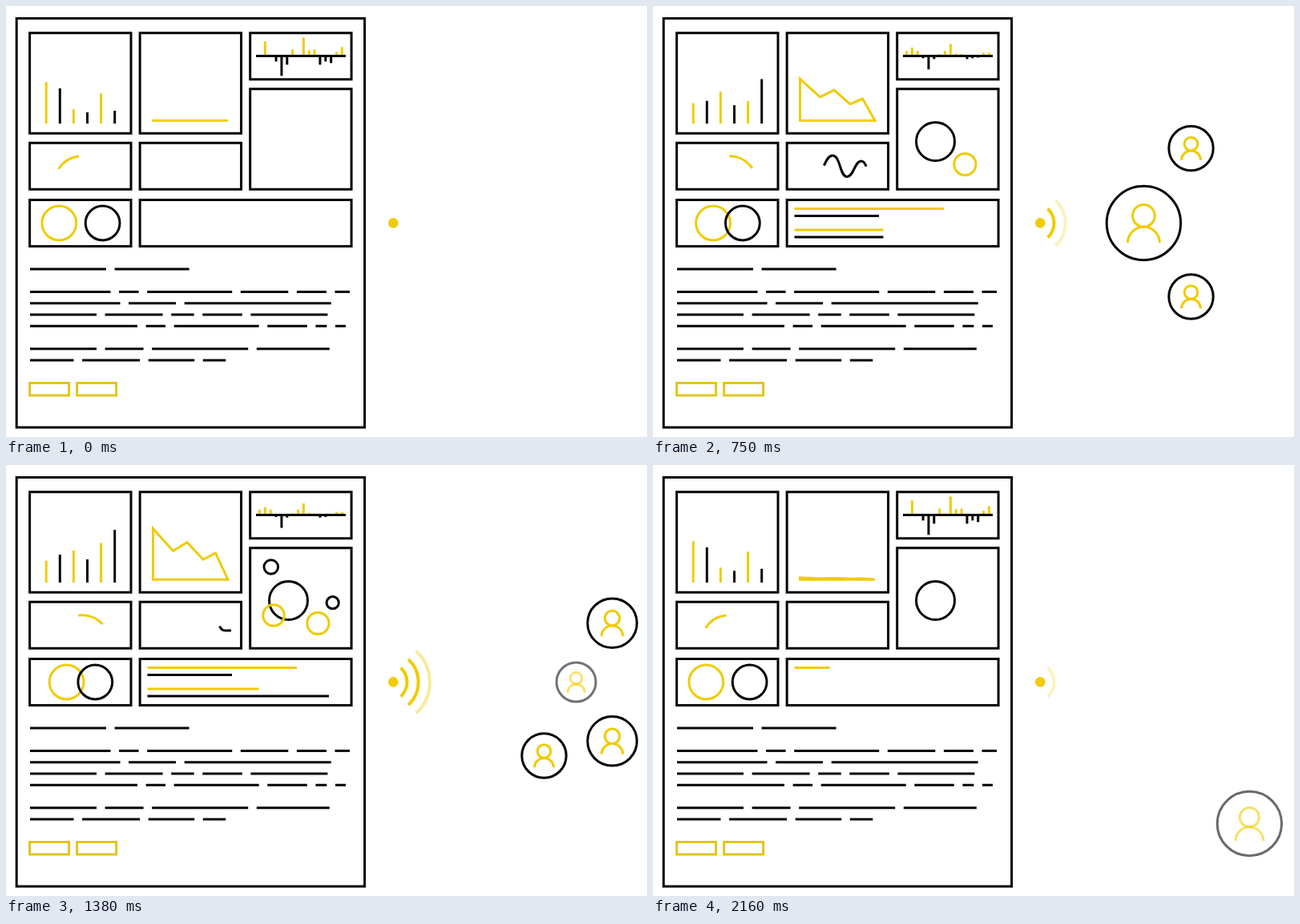
Animation of 800x539 px, one loop 2.19 s. Source, as an HTML page with a canvas:

```html
<!DOCTYPE html>
<html lang="en">
<head>
<meta charset="utf-8">
<title>Report broadcast</title>
<style>
  html, body { margin: 0; width: 100%; height: 100%; overflow: hidden; background: #fff; }
  canvas { display: block; }
</style>
</head>
<body>
<canvas id="stage" width="800" height="539"></canvas>
<script>
const ctx = document.getElementById('stage').getContext('2d');
const LOOP = 2190, STEP = 30;
const INK = '#050505', GOLD = '#f0cb05', BUTTON = '#e2c51c';
const { PI, cos, sin, min, max, abs } = Math;

const clamp = (v, lo = 0, hi = 1) => max(lo, min(hi, v));
const ramp = (t, start, span) => clamp((t - start) / span);
const ease = (p, n) => p < .5 ? (2 * p) ** n / 2 : 1 - (2 - 2 * p) ** n / 2;
const angle = t => 2 * PI * t / LOOP;

function stroke(color, path, width = 3) {
  ctx.strokeStyle = color;
  ctx.lineWidth = width;
  path ? ctx.stroke(path) : ctx.stroke();
}

function line(color, x1, y1, x2, y2) {
  ctx.beginPath();
  ctx.moveTo(x1, y1);
  ctx.lineTo(x2, y2);
  stroke(color);
}

function arc(color, x, y, r, from = 0, to = 2 * PI, width = 3) {
  ctx.beginPath();
  ctx.arc(x, y, r, from, to);
  stroke(color, null, width);
}

function box(x, y, w, h, color = INK) {
  ctx.beginPath();
  ctx.rect(x, y, w, h);
  stroke(color);
}

function panels() {
  const left = 29.6, top = 33.7, col = 137.55, wide = 126.4, gap = 11.95;
  const tall = 125.5, low = 58.1;
  box(13.2, 15.6, 434.4, 511.4);
  for (let c = 0; c < 3; c++) {
    const h = c < 2 ? tall : low, x = left + c * col;
    box(x, top, wide, h);
    box(x, top + h + gap, wide, tall + low - h);
  }
  box(left, 242.4, wide, low);
  box(left + col, 242.4, wide + col, low);
  for (const x of [left, 88.6]) box(x, 471.5, 49, 15.5, BUTTON);
}

// Word widths per line; an empty line is a paragraph break
const TEXT = [
  [95, 93], [],
  [100.5, 24.5, 106, 59.5, 37, 18.5],
  [112.5, 59, 183],
  [83, 72, 28.5, 49.5, 96],
  [134, 24.5, 106, 49.5, 14, 13], [],
  [83, 48, 120, 91],
  [54.5, 72, 57.5, 28.5]
];

function text() {
  TEXT.forEach((words, row) => {
    const y = 328.9 + row * 14.27;
    let x = 30;
    for (const w of words) {
      line(INK, x, y, x + w, y);
      x += w + 10.6;
    }
  });
}

// Mean height, then the swing once and twice per loop
const BARS = [[34, 9, 9], [34, 0, 10], [36, 0, -18], [24, 0, -10], [34, -16, 20], [49, -12, -21]];

function barChart(t) {
  const a = angle(t);
  BARS.forEach(([mean, slow, fast], i) => {
    const x = 50.2 + i * 17.1;
    const h = mean + slow * cos(a) + fast * cos(2 * a) - 2 * i * sin(a);
    line(i % 2 ? INK : GOLD, x, 147, x, 147 - h);
  });
}

function areaChart(t) {
  const s = min(t / 1136, (LOOP - t) / 1005), base = 143.2;
  const peaks = [[183.5, 79], [208.5, 44.4], [226, 57.7], [246, 31], [261.5, 41.2]];
  if (!s) return line(GOLD, 182, base, 277, base);
  ctx.beginPath();
  ctx.moveTo(277, base);
  ctx.lineTo(183.5, base);
  peaks.forEach(([x, h]) => ctx.lineTo(x, base - h * s));
  ctx.closePath();
  stroke(GOLD);
}

// Heights at the start of the loop; each bar swings to its rest height and back
const DELTAS = [0, 18, 0, 7, 25, 11, 8, 0, 23, 7, 8, 11, 7, 9, 5, 11];

function deltaChart(t) {
  const mid = (1 - cos(angle(t))) / 2;
  DELTAS.forEach((start, i) => {
    const x = 316.5 + i * 6.86, below = abs(i % 8 - 4) < 2;
    const h = start + (abs(.9 * start - 8) - start) * mid;
    line(below ? INK : GOLD, x, 62.4, x, 62.4 + (below ? h : -h));
  });
  line(INK, 312, 62.4, 424, 62.4);
}

// x, y, radius, colour, in the order they pop up
const BUBBLES = [
  [352.5, 169.5, 24, INK], [389.4, 198, 13.6, GOLD], [334, 188, 13.2, GOLD],
  [330.8, 127.5, 8.8, INK], [407.7, 172.2, 7.6, INK]
];

function bubbles(t) {
  BUBBLES.forEach(([x, y, r, color], i) => {
    if (t >= 270 * (i + 1) && t < LOOP - 75 * i) arc(color, x, y, r);
  });
}

function gauge(t) {
  const a = angle(t), limit = 57;
  const end = min(limit, 36.5 - 12.5 * cos(a) - 30.5 * cos(2 * a));
  const start = max(-limit, end - 55);
  const rad = deg => (deg - 90) * PI / 180;
  arc(GOLD, 95, 222.8, 35, rad(start), rad(end));
}

const WAVE = 'M185 199C194 199 194 213.5 203 213.5S214 187 224 187 ' +
  '233 213.5 242 213.5 251 194 260 194C267 194 265 207 273 207H281';
const wavePath = new Path2D(WAVE);
const waveShape = document.createElementNS('http://www.w3.org/2000/svg', 'path');
waveShape.setAttribute('d', WAVE);
const waveLength = waveShape.getTotalLength();

function wave(t) {
  const start = waveLength * ease(ramp(t, 130, 1650), 2);
  const end = waveLength * ease(ramp(t, 0, 1000), 2);
  if (end <= start) return;
  ctx.setLineDash([end - start, 999]);
  ctx.lineDashOffset = -start;
  stroke(INK, wavePath);
  ctx.setLineDash([]);
}

function venn(t) {
  const d = 10 * ease(1 - abs(2 * t / LOOP - 1), 3);
  arc(GOLD, 66.3 + d, 271.5, 21.4);
  arc(INK, 120.6 - d, 271.5, 21.4);
}

// Lines grow one after another and shrink in reverse order
function rules(t) {
  [186.5, 105.5, 139, 226.5].forEach((full, i) => {
    const y = 253.4 + 9 * (i % 2) + 26.6 * (i >> 1);
    const grown = .317 * (t - 200 * min(i, 2)), left = .8 * (2215 - 137 * i - t);
    const w = clamp(min(grown, left), 0, full);
    if (w) line(i % 2 ? INK : GOLD, 176.5, y, 176.5 + w, y);
  });
}

function signal(t) {
  ctx.fillStyle = GOLD;
  ctx.beginPath();
  ctx.arc(483.3, 271.4, 6.3, 0, 2 * PI);
  ctx.fill();
  for (let i = 0; i < 3; i++) {
    ctx.globalAlpha = ramp(t, 50 + 555 * i, 555) * (1 - ramp(t, 2045 - 165 * i, 155));
    arc(GOLD, 476, 271.5, 24.5 + 14.2 * i, -.83, .83, 4);
  }
  ctx.globalAlpha = 1;
}

// x, offset from the middle, radius, rank in leaving; listed in order of arrival
const PEOPLE = [
  [612.4, 0, 46.2, 0], [671.5, -93.5, 27.7, 1], [671.5, 92, 27.7, 3], [711.6, 0, 24.5, 2],
  [756.6, -73.8, 30.8, 4], [756.6, 73.8, 30.8, 5], [744.4, -177, 40.2, 6], [744.4, 177, 40.2, 7]
];

function people(t) {
  const fade = 120;
  PEOPLE.forEach(([x, dy, r, rank], i) => {
    const y = 271.5 + dy;
    ctx.globalAlpha = ramp(t, 131 + 208.5 * i, fade) * (1 - ramp(t, 1013 + 157 * rank, fade));
    arc(INK, x, y, r);
    arc(GOLD, x, y - .198 * r, .3 * r);
    arc(GOLD, x, y + .536 * r, .432 * r, PI, 2 * PI);
  });
  ctx.globalAlpha = 1;
}

const PARTS = [panels, text, barChart, areaChart, deltaChart, bubbles, gauge, wave, venn, rules, signal, people];
const begin = performance.now();

function draw() {
  const now = max(0, performance.now() - begin) % LOOP;
  const t = Math.floor(now / STEP) * STEP;
  ctx.clearRect(0, 0, 800, 539);
  PARTS.forEach(part => part(t));
  requestAnimationFrame(draw);
}
draw();
</script>
</body>
</html>
```
